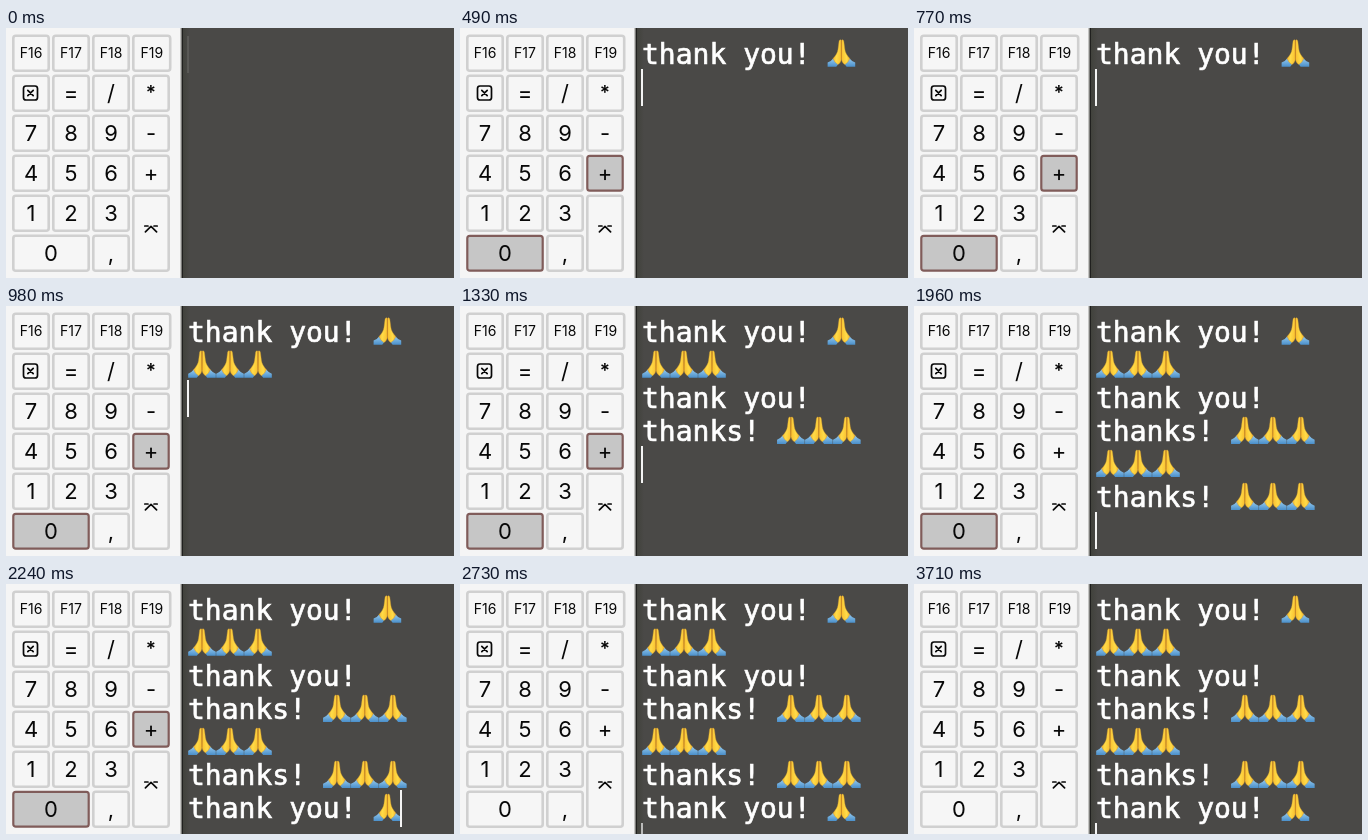
Recreate the animation shown at these times as an HTML page. Size 448x250 px, loop 3780 ms.

```html
<!DOCTYPE html>
<html lang="en">
<head>
<meta charset="utf-8">
<title>Thank-you keypad</title>
<style>
  html, body { margin: 0; width: 100%; height: 100%; overflow: hidden; background: #4a4947; }
  svg { display: block; width: 448px; height: 250px; }
  .cap { fill: #f6f6f6; stroke: #d0d0d0; stroke-width: 2.6; }
  .down .cap { fill: #c6c6c6; stroke: #805c5a; stroke-width: 2.2; }
  .key text { font: 22px Inter, Roboto, sans-serif; text-anchor: middle; fill: #080808; }
  .key text.small { font-size: 14px; }
  .key text.star { font-size: 19px; font-weight: 600; }
  .icon { fill: none; stroke: #080808; stroke-width: 1.7; stroke-linecap: round; stroke-linejoin: round; }
  .line { font: 28px "DejaVu Sans Mono", monospace; fill: #fff; stroke: #fff; stroke-width: .7; }
</style>
</head>
<body>
<svg id="stage" viewBox="0 0 448 250">
  <defs>
    <linearGradient id="skin" x1="0" y1="0" x2="1" y2="0.25">
      <stop offset="0" stop-color="#eda62c"/>
      <stop offset="0.55" stop-color="#ffdc48"/>
      <stop offset="1" stop-color="#fbc534"/>
    </linearGradient>
    <linearGradient id="sleeve" x1="0" y1="0" x2="0" y2="1">
      <stop offset="0" stop-color="#94c9ee"/>
      <stop offset="1" stop-color="#4a8fca"/>
    </linearGradient>
    <linearGradient id="edge">
      <stop offset="0" stop-color="#41423c"/>
      <stop offset="1" stop-color="#4a4947"/>
    </linearGradient>
    <g id="hand">
      <path d="M5.8 19.6 Q3.5 22.6 .2 23.8 V28 H8.8 L10.8 25.4 Z" fill="url(#sleeve)"/>
      <path d="M13.7 1.4 C12.6 .4 11.6 1.4 11.5 3.4 L10.6 10.5 C10.2 14 8.4 16.6 5.6 19.8 Q7 23.6 10.5 25.8 C12.8 24.4 13.9 22.4 13.9 19.4 Z" fill="url(#skin)" stroke="#d0922a" stroke-width=".4"/>
    </g>
    <g id="pray">
      <use href="#hand"/>
      <use href="#hand" transform="matrix(-1 0 0 1 28 0)"/>
      <path d="M14 2 V20" stroke="#d08a22" stroke-width=".8"/>
    </g>
  </defs>
  <rect width="448" height="250" fill="#4a4947"/>
  <rect width="174" height="250" fill="#f5f5f5"/>
  <rect x="174" width="1" height="250" fill="#c4c4c2"/>
  <rect x="175" width="1" height="250" fill="#7c7c79"/>
  <rect x="176" width="1" height="250" fill="#20201e"/>
  <rect x="177" width="7" height="250" fill="url(#edge)"/>
  <g id="keys"></g>
  <g id="lines"></g>
  <rect id="caret" width="2" height="37" fill="#f4f4f4"/>
</svg>
<script>
const LOOP = 3780, LEFT = 182, CHAR = 16.856, EMOJI = 28, PITCH = 33.05;

// Each entry: time, words, number of hands
const MESSAGES = [
  [490, 'thank you! ', 1],
  [840, '', 3],
  [1050, 'thank you!', 0],
  [1330, 'thanks! ', 3],
  [1610, '', 3],
  [1890, 'thanks! ', 3],
  [2240, 'thank you! ', 1]
];
const LAST_BREAK = 2310;
const PRESSES = {
  '0': [[140, 2590]],
  '+': [[350, 630], [770, 910], [980, 1120], [1330, 1400], [1610, 1680], [1820, 1960], [2100, 2310]]
};
// Caret opacity: time, value
const BLINK = [[0, .1], [70, .15], [350, 1], [2660, 1], [2870, 0], [3150, 0], [3430, 1], [LOOP, 1]];

const $ = id => document.getElementById(id);

function add(parent, tag, attrs = {}, text = '') {
  const node = document.createElementNS('http://www.w3.org/2000/svg', tag);
  for (const name in attrs) node.setAttribute(name, attrs[name]);
  node.textContent = text;
  return parent.appendChild(node);
}

const keys = {};
function addKey(label, col, row, cols = 1, rows = 1) {
  const small = /^F\d+$/.test(label), star = label === '*';
  const x = 7 + col * 40, y = 7.5 + row * 40;
  const w = cols * 40 - 4 + (small && col === 3 ? 1.5 : 0), h = rows * 40 - 4.5;
  const key = keys[label] = add($('keys'), 'g', { class: 'key' });
  add(key, 'rect', { class: 'cap', x: x + .3, y: y + .3, width: w - .6, height: h - .6, rx: 2.5 });
  if (label === 'clear') {
    add(key, 'rect', { x: 17.5, y: 58, width: 14, height: 14, rx: 2.5, class: 'icon' });
    add(key, 'path', { d: 'M21.8 62.3 l5.4 5.4 m0 -5.4 l-5.4 5.4', class: 'icon' });
  } else if (label === 'enter') {
    add(key, 'path', { d: 'M138.8 198 H142 M148 198 H151.2 M139.4 203.8 L145 198.4 L150.6 203.8', class: 'icon' });
  } else {
    const drop = small ? 5 : star ? 6 : 8;
    add(key, 'text', { x: x + w / 2, y: 25 + row * 40 + drop, class: small ? 'small' : star ? 'star' : '' }, label);
  }
}

['F16 F17 F18 F19', 'clear = / *', '7 8 9 -', '4 5 6 +', '1 2 3'].forEach((labels, row) =>
  labels.split(' ').forEach((label, col) => addKey(label, col, row)));
addKey('enter', 3, 4, 1, 2);
addKey('0', 0, 5, 2);
addKey(',', 2, 5);

const lines = MESSAGES.map(([, words, hands], i) => {
  const line = add($('lines'), 'g', { transform: `translate(${LEFT} ${i * PITCH})` });
  add(line, 'text', { class: 'line', y: 35.5 }, words);
  for (let n = 0; n < hands; n++) {
    add(line, 'use', { href: '#pray', x: words.length * CHAR + n * EMOJI, y: 10.8 });
  }
  return line;
});

function sample(points, t) {
  const i = Math.max(1, points.findIndex(p => p[0] > t));
  const [t0, a] = points[i - 1], [t1, b] = points[i];
  return a + (b - a) * (t - t0) / (t1 - t0);
}

function render(t) {
  for (const label in PRESSES) {
    keys[label].classList.toggle('down', PRESSES[label].some(([from, to]) => t >= from && t < to));
  }
  let row = 0;
  MESSAGES.forEach(([start], i) => {
    const shown = t >= start;
    lines[i].setAttribute('visibility', shown ? 'visible' : 'hidden');
    if (shown) row = i + 1;
  });
  let x = LEFT - 1;
  if (row === MESSAGES.length && t < LAST_BREAK) {
    const [, words, hands] = MESSAGES[--row];
    x += Math.floor(words.length * CHAR + hands * EMOJI);
  }
  $('caret').setAttribute('x', x);
  $('caret').setAttribute('y', 8 + row * 33);
  $('caret').setAttribute('opacity', sample(BLINK, t));
}

const began = performance.now();
function tick() {
  render((performance.now() - began) % LOOP);
  requestAnimationFrame(tick);
}
tick();
</script>
</body>
</html>
```
